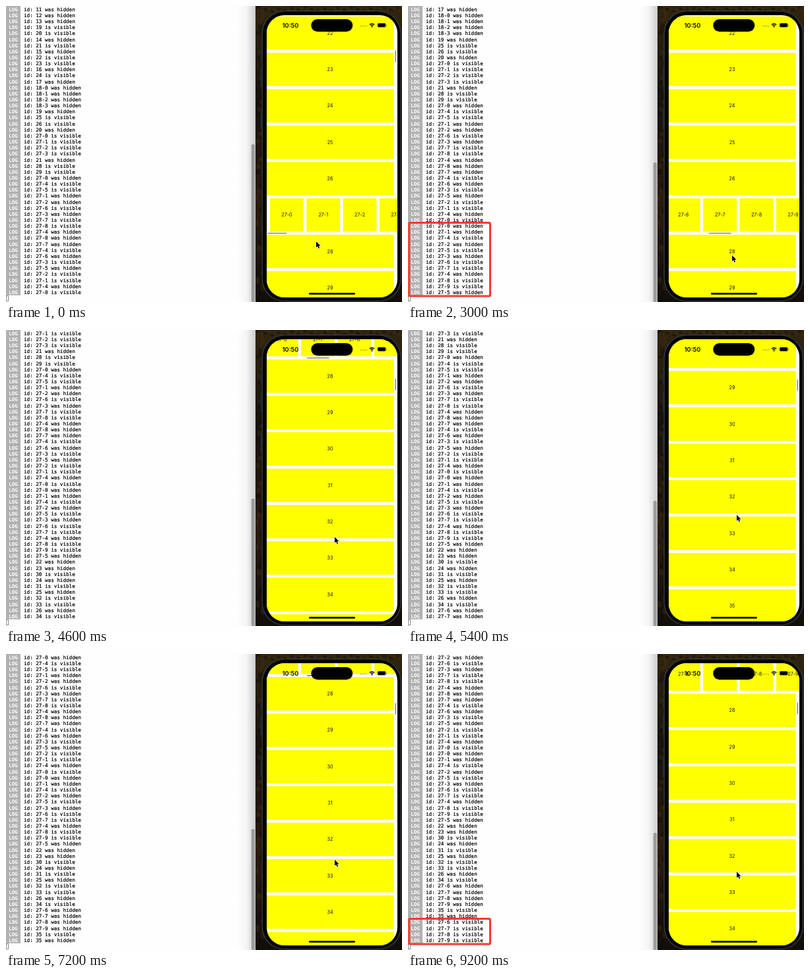
These frames come from a looping animation (600 by 450 pixels, 9400 ms). An HTML page with a canvas:

```html
<!DOCTYPE html>
<html lang="en">
<head>
<meta charset="utf-8">
<title>Visibility log</title>
<style>
  html, body { margin: 0; width: 100%; height: 100%; overflow: hidden; background: #fff; }
  canvas { display: block; width: 600px; height: 450px; }
</style>
</head>
<body>
<canvas id="stage" width="600" height="450"></canvas>
<script>
const ctx = document.getElementById('stage').getContext('2d');
const LOOP = 9400, STEP = 200, LOG_DELAY = 200;
const LINE = 9.149, LAST_LINE = 435, SHOWN = 48;
const PITCH = 55.33, TILE = 50.8, YELLOW = '#ffff00';
const SCREEN = { x: 395, y: 14, w: 198, h: 429 };

// What each gesture adds: row and list scroll, log lines, pointer travel.
const gestures = [
  { start: 200, time: 700, x: -7, y: -41 },
  { start: 600, time: 1235, row: 340, logs: 12 },
  { start: 1800, time: 1100, x: 28, y: 62 },
  { start: 3400, time: 1500, list: 305.5, logs: 10, x: 7, y: -65 },
  { start: 5000, time: 1400, list: 55.5, logs: 5, y: -52 },
  { start: 6600, time: 1200, list: -55.3, logs: 1, y: 58 },
  { start: 8000, time: 800, list: -18.2, logs: 4, y: 11 }
];

// Item ids, or a range of them, followed by v (is visible) or h (was hidden).
const log = `11..13h 19..20v 14h 21v 15h 22..23v 16h 24v 17h 18-0..3h 19h 25..26v 20h 27-0..3v
  21h 28..29v 27-0h 27-4..5v 27-1..2h 27-6v 27-3h 27-7..8v 27-4h 27-8h 27-7h 27-4v 27-6h 27-3v
  27-5h 27-2v 27-1v 27-4h 27-0v 27-0..1h 27-4v 27-2h 27-5v 27-3h 27-6..7v 27-4h 27-8..9v 27-5h
  22..23h 30v 24h 31v 25h 32..33v 26h 34v 27-6..9h 35v 35h 27-6..9v`.split(/\s+/).flatMap(expand);

function expand(token) {
  const [, row = '', first, last = first, state] = token.match(/^(\d+-)?(\d+)(?:\.\.(\d+))?([vh])$/);
  return Array.from({ length: last - first + 1 }, (_, i) =>
    `id: ${row}${+first + i} ${state === 'v' ? 'is visible' : 'was hidden'}`);
}

function glide(gesture, t) {
  const p = Math.min(1, Math.max(0, (t - gesture.start) / gesture.time));
  return 1 - (1 - p) ** 3;
}

function total(key, t, shape = v => v) {
  return gestures.reduce((sum, g) => sum + shape((g[key] || 0) * glide(g, t)), 0);
}

function fill(color, x, y, w, h, r = 0) {
  ctx.fillStyle = color;
  ctx.beginPath();
  ctx.roundRect(x, y, w, h, r);
  ctx.fill();
}

function text(str, x, y, font, color, align = 'center') {
  ctx.font = font;
  ctx.fillStyle = color;
  ctx.textAlign = align;
  ctx.fillText(str, x, y);
}

function gradient(x0, y0, x1, y1, ...stops) {
  const g = ctx.createLinearGradient(x0, y0, x1, y1);
  stops.forEach((c, i) => g.addColorStop(i / (stops.length - 1), c));
  return g;
}

function drawTerminal(count, t) {
  const mono = '7.6px "DejaVu Sans Mono", monospace';
  fill('#fefefe', 0, 0, 378, 450);
  fill(gradient(350, 0, 378, 0, '#fefefe', '#f5f5f5', '#cecece'), 350, 0, 28, 450);
  fill('#b2b1b2', 0, 0, 22, 439.8);
  ctx.strokeStyle = '#000';
  ctx.lineWidth = 0.2;
  for (let i = 0; i < SHOWN; i++) {
    const y = LAST_LINE - i * LINE + 2.8, line = log[count - 1 - i];
    text('LOG', 11, y, 'bold ' + mono, '#fff');
    text(line, 27, y, mono, '#000', 'left');
    ctx.strokeText(line, 27, y);
  }
  ctx.strokeStyle = '#8c8c8c';
  ctx.lineWidth = 1;
  ctx.strokeRect(0.5, 440.5, 3, 8);

  const top = 450 - 450 * 450 / (844 + LINE * (count - SHOWN));
  fill('#9c9c9c', 371.7, top, 5.2, 450 - top, 2.6);

  if (t >= 2000 && t < 3400) drawHighlight(12);
  if (t >= 8800) drawHighlight(4);
}

function drawHighlight(lines) {
  const h = lines * LINE + 1.8;
  ctx.strokeStyle = '#f43a30';
  ctx.lineWidth = 3;
  ctx.beginPath();
  ctx.roundRect(1.7, 441 - h, 122.8, h, 1.5);
  ctx.stroke();
}

function drawBackdrop() {
  fill(gradient(0, 0, 0, 450, '#30250f', '#171208', '#2b1b0c', '#120e08'), 378, 0, 222, 450);
  for (let i = 0; i < 45; i++) {
    const color = i % 2 ? '#46320f55' : '#08070555';
    fill(color, 378 + (i * 37) % 11, (i * 67) % 450, 3 + i % 5, 6 + i % 7, 3);
    fill(color, 380 + i * 5, (i * 5) % 7, 6, 4, 2);
  }
}

function drawPhoneBody() {
  for (const y of [67, 93, 157]) fill('#20242e', 385.5, y, 3, y > 67 ? 30 : 15, 1);
  fill('#3b3f49', 387.5, 7, 211.5, 442.5, 35);
  fill('#12141a', 388.5, 8, 209.5, 440.5, 34);
  fill('#000', 389.8, 9.3, 207, 438, 33);
}

function drawLabel(label, x, y) {
  text(label, x, y + 2.6, '7.2px Inter, sans-serif', '#111');
}

function drawRow(id, y, offset) {
  for (let i = 0; i < 12; i++) {
    const x = SCREEN.x + i * PITCH - offset;
    fill(YELLOW, x, y - TILE / 2, TILE, TILE);
    drawLabel(`${id}-${i}`, x + TILE / 2, y);
  }
}

function drawList(t) {
  const scroll = total('list', t), offset = total('row', t) - 5;
  for (let id = 21; id <= 37; id++) {
    const y = 373.1 + (id - 28) * PITCH - scroll;
    if (id % 9 === 0) {
      drawRow(id, y, id === 27 ? offset : 0);
    } else {
      fill(YELLOW, SCREEN.x, y - TILE / 2, 192.8, TILE);
      drawLabel(id, 491, y);
    }
  }
  if (t < 8000) {
    const x = 396.5 + Math.max(0, offset) * 0.177;
    fill('#858585', x, 344.7 - scroll, 34 + Math.min(0, offset), 1.6, 0.8);
  }
  if (t < 600 || t >= 3600) fill('#858585', 589.6, 68 + scroll * 0.021, 1.6, 17.5, 0.8);
}

function drawStatusBar() {
  text('10:50', 431, 32.6, '600 9.2px Inter, sans-serif', '#000');
  fill('#000', 462.3, 20, 63, 19, 9.5);
  for (let i = 0; i < 4; i++) fill('#8c8a18', 537 + i * 2.8, 29.7, 1.5, 1.5, 0.75);
  ctx.strokeStyle = '#000';
  ctx.lineWidth = 1.4;
  for (const r of [2.6, 5]) {
    ctx.beginPath();
    ctx.arc(554.5, 32, r, -Math.PI * 0.76, -Math.PI * 0.24);
    ctx.stroke();
  }
  fill('#000', 553.6, 30.8, 1.8, 1.8, 0.9);
  fill('#777700', 562.8, 26, 12.8, 6.4, 2);
  fill('#000', 563.5, 26.6, 11.3, 5.2, 1.4);
  fill('#777700', 576.1, 28.2, 0.9, 2.2, 0.4);
  fill('#000', 459, 436, 70, 2.8, 1.4);
}

function drawPhone(t) {
  drawPhoneBody();
  ctx.save();
  ctx.beginPath();
  ctx.roundRect(SCREEN.x, SCREEN.y, SCREEN.w, SCREEN.h, 27);
  ctx.clip();
  fill('#fff', SCREEN.x, SCREEN.y, SCREEN.w, SCREEN.h);
  drawList(t);
  drawStatusBar();
  ctx.restore();
}

function drawPointer(x, y) {
  const arrow = new Path2D('M0 0V9.2L2.1 7.3L3.6 10.8L5.2 10.1L3.7 6.7H6.6Z');
  ctx.save();
  ctx.translate(x, y);
  ctx.lineWidth = 1.2;
  ctx.lineJoin = 'round';
  ctx.strokeStyle = '#fff';
  ctx.stroke(arrow);
  ctx.fillStyle = '#000';
  ctx.fill(arrow);
  ctx.restore();
}

function render(now) {
  const t = Math.floor(now % LOOP / STEP) * STEP;
  drawBackdrop();
  drawTerminal(SHOWN + total('logs', t - LOG_DELAY, Math.round), t);
  drawPhone(t);
  drawPointer(470 + total('x', t), 358 + total('y', t));
  requestAnimationFrame(render);
}

requestAnimationFrame(render);
</script>
</body>
</html>
```
